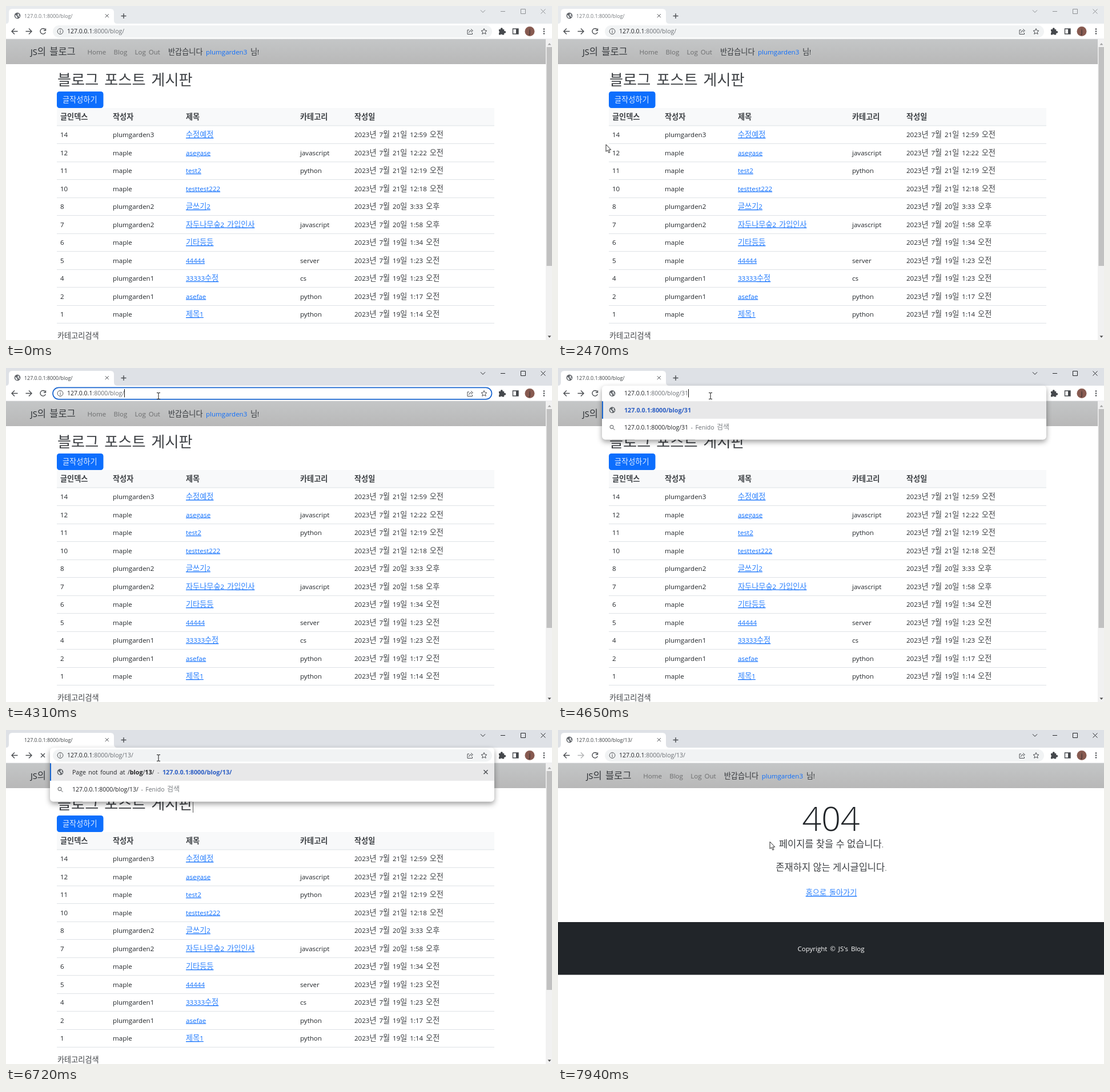
Animation, 956 px wide and 586 px high, one loop 8 s. Source, as an HTML page:

```html
<!DOCTYPE html>
<html lang="ko">
<head>
<meta charset="utf-8">
<title>Blog</title>
<style>
html, body { margin: 0; width: 100%; height: 100%; overflow: hidden; background: #fff; }
svg { display: block; }
text { font: 11.55px "Open Sans", "Noto Sans CJK KR", sans-serif; word-spacing: .165em; white-space: pre; fill: #212529; }
.k { font-family: "Noto Sans CJK KR", "Noto Sans CJK", sans-serif; font-size: 1.14em; fill-opacity: .87; }
.th, .b { font-weight: 700; }
.a { fill: #0d6efd; }
.link { fill: #0d6efd; text-decoration: underline; }
.nav { fill: #6b6c6d; }
.w { fill: #fff; }
.brand { font-size: 14.5px; }
.h { font-size: 23px; font-weight: 300; }
.big { font-size: 59px; font-weight: 300; word-spacing: 0; }
.lead { font-size: 14.5px; font-weight: 300; word-spacing: .5px; }
.mid { text-anchor: middle; }
.u { font-size: 10.5px; fill: #202124; }
.u .b { font-size: 1.02em; }
.tab { font-size: 8.9px; fill: #3c4043; }
.g { fill: #6a6e73; }
.dash { fill: #6a6e73; word-spacing: .27em; }
.bl { fill: #2a5dc4; }
.ic { fill: none; stroke: #4a4d51; stroke-width: 1.4; }
.thin { stroke-width: 1; }
.panel { filter: drop-shadow(0 4px 5px rgba(0,0,0,.38)); }
.win { fill: none; stroke: #25272a; stroke-width: 1; }
.off .tab { fill: #74787c; }
.off .win { stroke: #8e9194; }
</style>
</head>
<body>
<svg width="956" height="586" viewBox="0 0 956 586">
  <defs>
    <linearGradient id="bar" x2="0" y2="1">
      <stop stop-color="#c4c6c7"/><stop offset="1" stop-color="#b8b8b8"/>
    </linearGradient>
    <g id="globe">
      <circle r="5.4" fill="#5f6368"/>
      <path d="M-4.2-1.5Q-2-.8-1 .5T.5 3L-.6 4.4Q-4 3.5-4.2-1.5ZM.2-4.2L3.4-2.6 2.6-.6 4.4 1Q3.6 2.6 2.6 2.4L1.8 .6 -.6-.8 1-2.4Z" fill="#e4e6e8"/>
    </g>
    <g id="lens" class="ic thin"><circle cx="-1" cy="-1" r="3"/><path d="M1.2 1.2L4.4 4.4"/></g>
    <path id="cross" d="M-3.5-3.5L3.5 3.5M3.5-3.5L-3.5 3.5"/>
  </defs>
  <g id="list"></g>
  <g id="lost"></g>
  <g id="chrome"></g>
  <g id="omni"></g>
  <g id="mouse">
    <path id="arrow" d="M0 0V12.4L2.8 9.9 4.9 14.6 6.9 13.7 4.9 9.2H8.7Z" fill="#fff" stroke="#111" stroke-width=".9"/>
    <g id="beam">
      <circle id="press" cx="-1" r="11" fill="#f5e233" opacity=".6"/>
      <path d="M-3-5.5H-.8L0-5 .8-5.5H3M0-5V5M-3 5.5H-.8L0 5 .8 5.5H3" fill="none" stroke="#111"/>
    </g>
  </g>
</svg>
<script>
const $ = id => document.getElementById(id);
const LOOP = 8000, STEP = 66.6;
const HOST = '127.0.0.1:8000/blog/';

const span = (c, s) => `<tspan class="${c}">${s}</tspan>`;
const text = (x, y, s, c = '') =>
  `<text x="${x}" y="${y}" class="${c}">${s.replace(/[가-힣]+/g, m => span('k', m))}</text>`;
const rect = (x, y, w, h, fill, r = 0, more = '') =>
  `<rect x="${x}" y="${y}" width="${w}" height="${h}" rx="${r}" fill="${fill}" ${more}/>`;
const path = (d, c = 'ic') => `<path d="${d}" class="${c}"/>`;
const use = (id, x, y, c = '') => `<use href="#${id}" x="${x}" y="${y}" class="${c}"/>`;

// ---- pages ----
const user = n => 'plumgarden' + n;
const owner = 'maple';

function navbar(w, dx) {
  const y = 85;
  return rect(0, 58, w, 44, 'url(#bar)') +
    text(43 + dx, 86, 'JS의 블로그', 'brand') +
    text(142.5 + dx, y, 'Home', 'nav') + text(188.5 + dx, y, 'Blog', 'nav') +
    text(225.5 + dx, y, 'Log Out', 'nav') + text(284 + dx, y, '반갑습니다') +
    text(350 + dx, y, user(3), 'a') + text(428 + dx, y, '님!');
}

const cols = [95, 187, 315, 515, 610];
const posts = [
  [14, user(3), '수정예정', '', '21일 12:59 오전'],
  [12, owner, 'asegase', 'javascript', '21일 12:22 오전'],
  [11, owner, 'test2', 'python', '21일 12:19 오전'],
  [10, owner, 'testtest222', '', '21일 12:18 오전'],
  [8, user(2), '글쓰기2', '', '20일 3:33 오후'],
  [7, user(2), '자두나무숲2 가입인사', 'javascript', '20일 1:58 오후'],
  [6, owner, '기타등등', '', '19일 1:34 오전'],
  [5, owner, '44444', 'server', '19일 1:23 오전'],
  [4, user(1), '33333수정', 'cs', '19일 1:23 오전'],
  [2, user(1), 'asefae', 'python', '19일 1:17 오전'],
  [1, owner, '제목1', 'python', '19일 1:14 오전']
];
const line = y => rect(89, y, 766, 1, '#dee2e6');

$('list').innerHTML =
  rect(0, 58, 956, 528, '#fff') + navbar(945, 0) +
  text(90, 138.8, '블로그 포스트 게시판', 'h') +
  rect(89, 150, 81.5, 29, '#0d6efd', 4.5) + text(99, 169, '글작성하기', 'w') +
  rect(89, 179, 766, 31, '#f8f9fa') + line(209.5) +
  ['글인덱스', '작성자', '제목', '카테고리', '작성일']
    .map((s, i) => text(cols[i], 199.3, s, 'th')).join('') +
  posts.map((p, r) => {
    const y = 230 + r * 31.5;
    return p.map((s, i) =>
      text(cols[i], y, i == 4 ? '2023년 7월 ' + s : String(s), i == 2 ? 'link' : '')).join('') +
      line(Math.round(y + 11));
  }).join('') +
  text(90, 582.5, '카테고리검색') +
  rect(945, 58, 11, 528, '#f1f1f1') + rect(946.5, 72, 9.5, 384, '#c1c1c1') +
  '<path d="M948.5 68.5h6l-3-3.5z" fill="#a3a3a3"/><path d="M948.5 578.5h6l-3 3.5z" fill="#505050"/>';

$('lost').innerHTML =
  rect(0, 58, 956, 528, '#fff') + navbar(956, 6.7) +
  text(478, 177, '404', 'big mid') +
  text(478.5, 205.5, '페이지를 찾을 수 없습니다.', 'lead mid') +
  text(478.5, 246.5, '존재하지 않는 게시글입니다.', 'lead mid') +
  text(478.5, 290, '홈으로 돌아가기', 'link mid') +
  rect(0, 337, 956, 92.5, '#212529') + text(478, 387.5, "Copyright © JS's Blog", 'w mid');

// ---- browser frame ----
function frame(s) {
  const back = 'M20.5 44.5H10.5M15 39.5L10 44.5 15 49.5';
  const fwd = 'M34.5 44.5H45M40 39.5L45 44.5 40 49.5';
  const reload = 'M68.6 41.4A4.8 4.8 0 1 0 69.3 46M69.5 39.5V43H66';
  return `<g class="${s.off ? 'off' : ''}">` +
    rect(0, 0, 956, 31, s.off ? '#e7eaed' : '#dee1e6') +
    '<path d="M0 31Q5 31 5 25V11Q5 5 11 5H183Q189 5 189 11V25Q189 31 195 31Z" fill="#fff"/>' +
    (s.load ? '' : use('globe', 20, 17)) +
    text(32, 20.7, HOST + (s.lost ? '13/' : ''), 'tab') +
    path('M173.8 14.2L179.8 20.2M179.8 14.2L173.8 20.2', 'ic thin') +
    path('M201.5 17.5H210.5M206 13V22') +
    path('M831 7.3L835 11.3 839 7.3M866 9.5H874M901.5 5.5H909.5V13.5H901.5ZM936.5 5.5L944.5 13.5M944.5 5.5L936.5 13.5', 'win') +
    rect(0, 31, 956, 27, '#fff') + rect(0, 57.5, 956, .7, '#dfe1e4') +
    path(back) + `<g opacity="${s.lost ? .42 : 1}">${path(fwd)}</g>` +
    (s.load ? use('cross', 64.5, 44.5, 'ic') : path(reload)) +
    // toolbar buttons
    '<path d="M863 41h3a2 2 0 1 1 3.6 0h2.6v3a2 2 0 1 1 0 3.4v3h-3.4a1.7 1.7 0 0 0-3 0H863v-3.2a1.8 1.8 0 0 0 0-3.2z" fill="#45484c"/>' +
    path('M887.5 40H897V49H887.5Z') + rect(893, 40, 4, 9, '#45484c') +
    '<circle cx="917" cy="44.5" r="8.5" fill="#875a50"/>' +
    text(917, 48, 'j', 'u w mid') +
    [40.5, 44.5, 48.5].map(y => `<circle cx="942" cy="${y}" r="1.2" fill="#45484c"/>`).join('') + '</g>';
}

// ---- address bar ----
const tools = path('M811 42H808V49.5H816.5V47M810.5 47Q811 43 815 43M814 40.5L817.5 43.3 814 46', 'ic thin') +
  path('M837 39.6L838.5 43 842 43.3 839.3 45.7 840.2 49.3 837 47.4 833.8 49.3 834.7 45.7 832 43.3 835.5 43Z', 'ic thin');
const info = '<circle cx="95" cy="44.5" r="4.9" class="ic thin"/>' + path('M95 43.6V47.4M95 41.4V42.6', 'ic thin');

function pill(s) {
  return s.mode == 'focus'
    ? rect(82, 34.3, 768.5, 20.6, '#fff', 10.3, 'stroke="#1a66d0" stroke-width="1.7"')
    : rect(82, 34, 769, 21.5, s.hover ? '#ecedef' : '#f1f3f4', 10.7);
}

const b = s => span('b', s), bl = s => span('bl', s), dash = span('dash', ' - ');
const find = tail => HOST + tail + span('g', ' - Fenido 검색');
const pair = (n, rest) => b(HOST + n) + rest + dash + bl(b(HOST + n) + rest);
const missing = n => 'Page not found at /' + b('blog') + '/' + b(n);

const short = tail => [bl(b(HOST + tail)), find(tail)];
const many = [
  pair('1', '/'), find('1'), pair('1', '0/'), pair('1', '1/'),
  '게시물상세페이지?' + dash + bl(b(HOST + '1')),
  missing('1') + '3/' + dash + bl(b(HOST + '1') + '3/'),
  bl(b(HOST + '1') + '2/')
];
const hit = missing('13') + '/' + dash + bl(b(HOST + '13/'));

function panel(s) {
  const n = s.rows.length;
  return rect(77, 31, 778, 33.3 + n * 30.7, '#fff', 6, 'class="panel"') +
    rect(77, 58.3, 778, 30.7, '#e8e8e9') + rect(77, 58.3, 2, 30.7, '#1a66d0') +
    s.rows.map((row, i) => {
      const y = 73.7 + i * 30.7;
      return use(i == 1 ? 'lens' : 'globe', 95, y) + text(116, y + 4, row, 'u');
    }).join('') +
    (s.del ? use('cross', 840, 73.7, 'ic') : '');
}

function bar(s) {
  const open = s.mode == 'open';
  return (s.rows ? panel(s) : '') +
    (open ? use('globe', 95, 44.5) : pill(s) + info + tools) +
    '<rect id="sel" y="36" height="17" fill="#9cc5fb"/>' +
    '<g id="url">' +
    text(open ? 116 : 107, 48.4, '127.0.0.1' + span('g', ':8000/blog/' + (s.tail || '')), 'u') +
    '</g><rect id="caret" y="37" width="1" height="14.5" fill="#111"/>' +
    (s.load && s.rows ? rect(327, 126, 1, 19, '#555') : '');
}

// time, state; sel = number of selected characters at the end
const typed = (tail, rows, more) => ({ mode: 'open', tail, rows, sel: 0, ...more });
const states = [
  [0, { mode: 'idle', off: 1 }],
  [3440, { mode: 'focus', sel: 0 }],
  [3510, { mode: 'focus', sel: HOST.length }],
  [4310, { mode: 'focus', sel: 0 }],
  [4510, typed('3', short('3'))],
  [4650, typed('31', short('31'))],
  [5180, typed('3', short('3'))],
  [5250, typed('', short(''))],
  [5380, typed('1/', many, { sel: 1, del: 1 })],
  [5980, typed('13/', [hit, find('13'), bl(b(HOST + '13'))], { sel: 1, del: 1 })],
  [6200, typed('13/', [hit, find('13/')], { del: 1 })],
  [6720, { mode: 'idle', tail: '13/', rows: [hit, find('13/')], del: 1, load: 1 }],
  [6790, { mode: 'idle', tail: '13/', lost: 1, load: 1, hover: 1 }],
  [6850, { mode: 'idle', tail: '13/', lost: 1, hover: 1 }],
  [7530, { mode: 'idle', tail: '13/', lost: 1 }]
];

function show(s) {
  $('lost').style.display = s.lost ? '' : 'none';
  $('chrome').innerHTML = frame(s);
  $('omni').innerHTML = bar(s);
  const url = $('url').firstChild, n = url.getNumberOfChars();
  const end = url.getEndPositionOfChar(n - 1).x;
  if (s.sel) {
    const from = url.getStartPositionOfChar(n - s.sel).x;
    $('sel').setAttribute('x', from);
    $('sel').setAttribute('width', end - from);
  }
  $('caret').setAttribute('x', Math.round(end));
  $('caret').style.display = s.sel === 0 ? '' : 'none';
}

// ---- pointer: time, x, y ----
const track = [
  [460, 795, 464], [700, 600, 300], [960, 285, 84], [1190, 350, 130],
  [1330, 404, 62], [1600, 260, 260], [1900, 90, 470], [2120, 4, 574],
  [2190, 4, 570], [2330, 50, 380], [2450, 84, 243], [2500, 84, 243], [2700, 100, 230], [2950, 112, 222],
  [3020, 115, 218], [3370, 237, 51], [3480, 237, 51], [3800, 267, 49],
  [7450, 267, 49], [7570, 290, 170], [7670, 325, 310], [7730, 340, 335], [7820, 365, 260], [7900, 371, 196]
];

function pointer(t) {
  const q = 460 + Math.floor((t - 460) / STEP) * STEP;
  const i = track.findIndex(p => p[0] > q);
  if (i < 0) return track[track.length - 1].slice(1);
  if (i == 0) return track[0].slice(1);
  const [t0, x0, y0] = track[i - 1], [t1, x1, y1] = track[i];
  const p = (q - t0) / (t1 - t0);
  return [x0 + (x1 - x0) * p, y0 + (y1 - y0) * p];
}

let current;
function draw(now) {
  const t = now % LOOP;
  const s = states.filter(e => e[0] <= t).pop()[1];
  if (s !== current) show(current = s);
  const [x, y] = pointer(t), beam = y < 56;
  $('mouse').style.display = t < 460 ? 'none' : '';
  $('mouse').setAttribute('transform', `translate(${Math.round(x)} ${Math.round(y)})`);
  $('arrow').style.display = beam ? 'none' : '';
  $('beam').style.display = beam ? '' : 'none';
  $('press').style.display = t >= 3440 && t < 3510 ? '' : 'none';
  requestAnimationFrame(draw);
}
draw(0);
</script>
</body>
</html>
```
